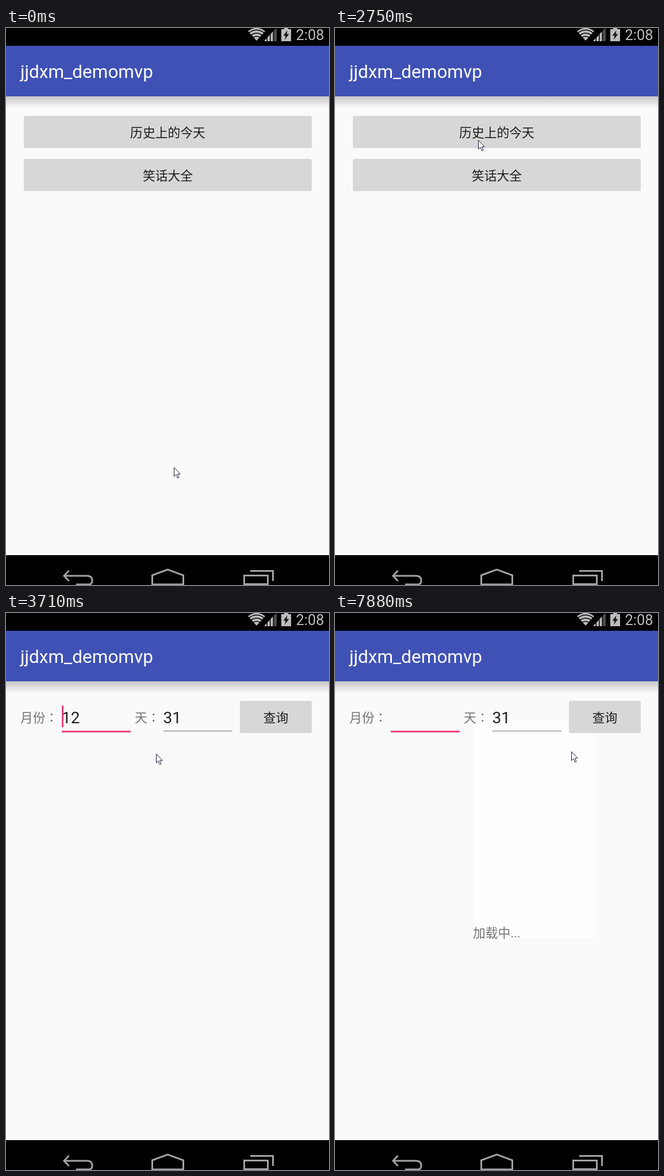
Write an HTML page that moves like this. It is 562 by 970 pixels and loops after 8 s.

```html
<!DOCTYPE html>
<html>
<head>
<meta charset="utf-8">
<title>jjdxm_demomvp</title>
<style>
  html, body { margin: 0; width: 100%; height: 100%; overflow: hidden; background: #000; }
  svg { display: block; font-family: Roboto, "Noto Sans CJK SC", sans-serif; font-size: 21.8px; }
  .title { font-size: 31.5px; fill: #fff; }
  .button { fill: #d6d7d7; }
  .caption { fill: #1c1c1c; text-anchor: middle; }
  .label { fill: #737373; }
  .colon { font-family: "Noto Sans CJK TC", "Noto Sans CJK JP", sans-serif; font-feature-settings: "locl" 0; }
  .value { font-size: 28.1px; fill: #212121; }
  .accent { fill: #f5427f; }
  .nav { fill: none; stroke: #a2a2a2; stroke-width: 3; }
</style>
</head>
<body>
<svg width="562" height="970" viewBox="0 0 562 970">
  <defs>
    <linearGradient id="fade" x2="0" y2="1">
      <stop offset="0" stop-opacity=".21"/>
      <stop offset="1" stop-opacity=".01"/>
    </linearGradient>
    <g id="frame">
      <rect y="31" width="562" height="887" fill="#fafafa"/>
      <rect y="119" width="562" height="19" fill="url(#fade)"/>
      <rect y="31" width="562" height="88" fill="#3f51b5"/>
      <text class="title" x="25" y="87">jjdxm_demomvp</text>
    </g>
  </defs>

  <g id="home">
    <use href="#frame"/>
    <rect class="button" x="31" y="153" width="501" height="56" rx="3"/>
    <rect class="button" x="31" y="228" width="501" height="56" rx="3"/>
    <text class="caption" x="281.5" y="190">历史上的今天</text>
    <text class="caption" x="281.5" y="265">笑话大全</text>
  </g>
  <rect id="dim" y="31" width="562" height="887" opacity="0"/>

  <g id="query" opacity="0">
    <use href="#frame"/>
    <rect id="panel" x="240" y="188" width="212" height="379" fill="#fefefe"/>
    <text class="label" x="25" y="190">月份<tspan class="colon" lang="zh-Hant">：</tspan></text>
    <text class="label" x="224" y="190">天<tspan class="colon" lang="zh-Hant">：</tspan></text>
    <text class="value" id="month" x="97" y="192">12</text>
    <text class="value" x="273.5" y="192">31</text>
    <rect class="accent" x="97" y="205" width="120" height="3"/>
    <rect x="274" y="205" width="120" height="1" fill="#737373"/>
    <rect class="accent" id="caret" x="97" y="161" width="3" height="38"/>
    <rect class="button" x="407" y="153" width="125" height="56" rx="3"/>
    <text class="caption" x="469.5" y="190">查询</text>
    <text class="label" id="loading" x="240" y="565">加载中...</text>
  </g>

  <rect width="562" height="31"/>
  <g fill="#bdbdbd">
    <path d="M436 22L421 5.5Q436-6 451 5.5Z"/>
    <path d="M422 9Q436-2 450 9M425.5 13Q436 5 446.5 13M429 17Q436 12 443 17" fill="none" stroke="#000" stroke-width="1.6"/>
    <path d="M450 23V21.5L453.5 18V23ZM455 23V16.5L459 12V23ZM460.5 23V10.5L464.5 6V23Z"/>
    <path d="M466 23V4.5L471 0V23Z" fill="#4c4c4c"/>
    <path d="M479 23V2H484V0H491V2H496V23Z"/>
    <path d="M489.5 4L482.5 13.5H486.5L485 20.5L492.5 10.5H488.5Z" fill="#161616"/>
    <text x="504.5" y="21" font-size="25.4">2:08</text>
  </g>

  <rect y="918" width="562" height="52"/>
  <g class="nav">
    <path d="M109.5 945L101 954L109.5 963M101 954H141Q150 954 150 962Q150 969 144 969H122"/>
    <path d="M254.5 969V953L281.5 943L308.5 953V969Z"/>
    <path d="M414.500 972V953.500H455.500V972M414.500 968.500H455.500M425 945.500H464.500V963"/>
  </g>

  <path id="cursor" d="M.5.5V16L4 12.7L6.6 18.8L9 17.8L6.5 11.9H11.3Z" fill="#fff" stroke="#151a33"/>
</svg>
<script>
const LOOP = 8000;
const REFRESH = 140;
const OPENED = 2752, ERASED = 6190, LOADING = 7760;

// Pointer moves: start, end, x, y
const moves = [
  [910, 1470, 231, 290],
  [1470, 1890, 241, 184],
  [2320, 2730, 249, 195],
  [2730, 3300, 261, 245],
  [3710, 5110, 433, 178],
  [5250, 6370, 150, 217],
  [6670, 7490, 440, 188],
  [7630, 7770, 411, 241]
];

const el = id => document.getElementById(id);
const set = (id, name, value) => el(id).setAttribute(name, value);
const show = (id, on) => set(id, "visibility", on ? "visible" : "hidden");
const clamp = v => Math.min(1, Math.max(0, v));

function pointerAt(t) {
  let x = 292, y = 765;
  for (const [start, end, toX, toY] of moves) {
    const k = clamp((t - start) / (end - start));
    x += (toX - x) * k;
    y += (toY - y) * k;
  }
  return [Math.round(x), Math.round(y)];
}

function draw(t) {
  set("cursor", "transform", `translate(${pointerAt(t)})`);

  // The second screen grows and fades in over the dimmed first one
  const p = clamp((t - OPENED) / 300);
  const scale = 1 - .2 * (1 - p) ** 2;
  set("query", "transform", `translate(281 456) scale(${scale}) translate(-281 -456)`);
  set("query", "opacity", clamp(p * 1.48));
  set("dim", "opacity", p * .46);

  // The caret blinks once a second and restarts when a key is pressed
  const erased = t >= ERASED;
  el("month").textContent = erased ? "" : "12";
  show("caret", (t - (erased ? ERASED : 2500)) % 1000 < 500);

  show("panel", t >= LOADING);
  show("loading", t >= LOADING);
}

let start;
function frame(now) {
  start ??= now;
  const time = (now - start) % LOOP;
  draw((Math.floor(time / REFRESH - .5) + .5) * REFRESH);
  requestAnimationFrame(frame);
}
draw(0);
requestAnimationFrame(frame);
</script>
</body>
</html>
```
